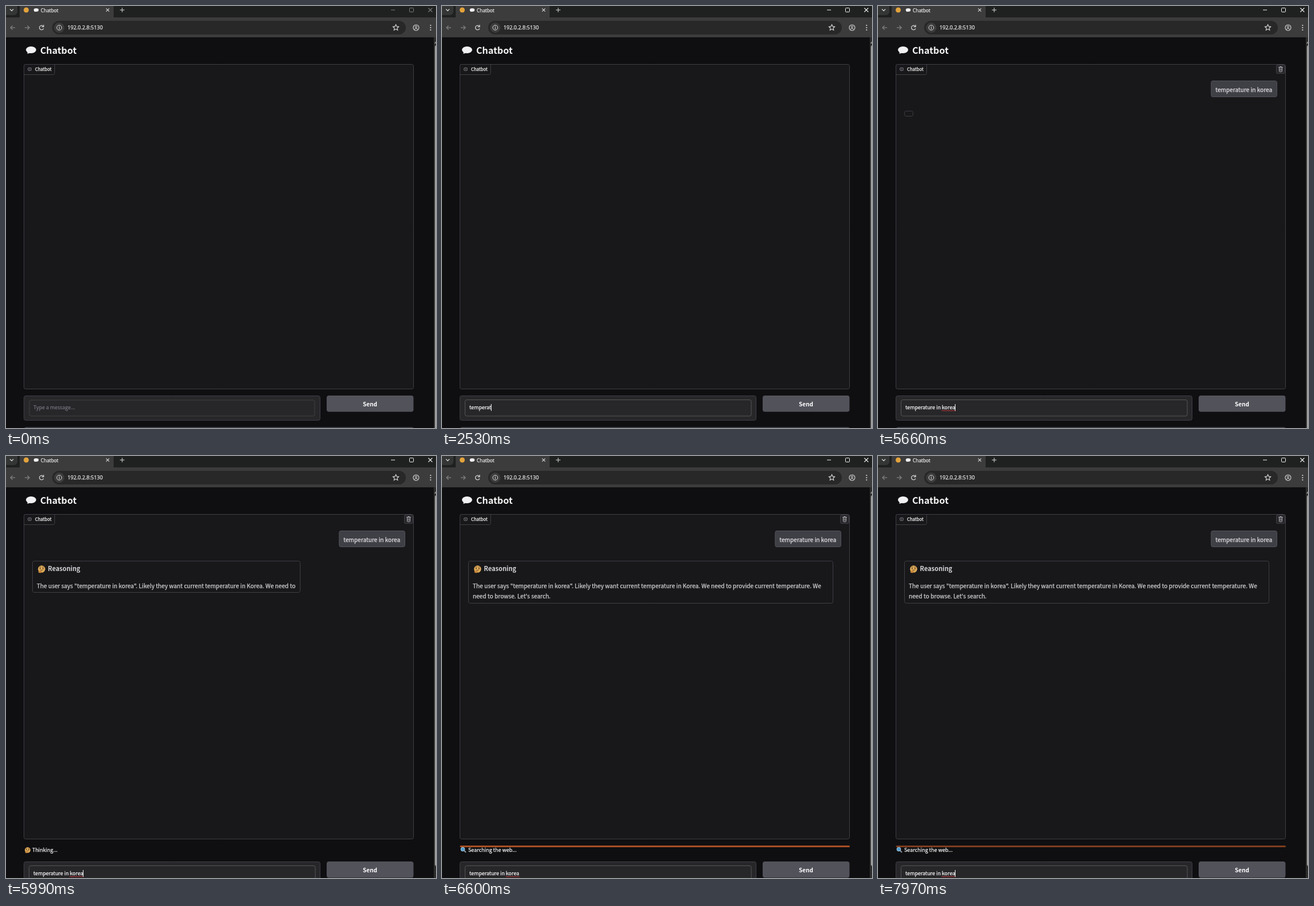
Write an HTML page with a canvas that moves like this. It is 755x741 px and loops after 8000 ms.

```html
<!DOCTYPE html>
<html lang="en">
<head>
<meta charset="utf-8">
<title>Chatbot</title>
<style>
html, body { margin: 0; width: 100%; height: 100%; overflow: hidden; background: #0f0f11; }
canvas { display: block; }
</style>
</head>
<body>
<canvas id="stage" width="755" height="741"></canvas>
<script>
const ctx = document.getElementById('stage').getContext('2d', { alpha: false });
const SANS = '"Noto Sans CJK KR", "Noto Sans CJK JP", "Noto Sans CJK SC", "Noto Sans CJK", sans-serif';
const UI = '"Open Sans", "Noto Sans", sans-serif';
const QUERY = 'temperature in korea';
const THOUGHT = `The user says "${QUERY}". Likely they want current temperature in Korea. We need to`;

const LOOP = 8000, BLINK = 530, KEY_GAP = 92;
const AWAKE = 130, FOCUS = 530, SENT = 4930, REPLY = 5050, SPELL = 5620, REASON = 5990, SEARCH = 6060;
// Keys come in bursts, evenly spaced within each
const BURSTS = { 1200: 'te', 1810: 'm', 2060: 'pe', 2330: 'rat', 3410: 'ure ', 3820: 'in ', 4220: 'korea' };

const PAGE = '#0f0f11', PANEL = '#18181a', BLOCK = '#27272a', EDGE = '#3f3f46';
const WHITE = '#f4f4f5', ICON = '#dedede', MUTED = '#868686';

const clamp = v => Math.max(0, Math.min(1, v));
const mix = (a, b, k) => Math.round(a + (b - a) * k);
const grey = v => `rgb(${v},${v},${v})`;

function rect(x, y, w, h, fill) {
  ctx.fillStyle = fill;
  ctx.fillRect(x, y, w, h);
}

function box(x, y, w, h, r, fill, edge) {
  ctx.beginPath();
  ctx.roundRect(x, y, w, h, r);
  if (fill) { ctx.fillStyle = fill; ctx.fill(); }
  if (edge) { ctx.strokeStyle = edge; ctx.lineWidth = 1; ctx.stroke(); }
}

function text(str, x, y, size, color, weight = 400, family = SANS) {
  ctx.font = `${weight} ${size}px ${family}`;
  ctx.fillStyle = ctx.strokeStyle = color;
  ctx.fillText(str, x, y);
  if (weight === 400) {
    ctx.lineWidth = .25;
    ctx.strokeText(str, x, y);
  }
}

function line(x1, y1, x2, y2, color, width = 1) {
  ctx.beginPath();
  ctx.moveTo(x1, y1);
  ctx.lineTo(x2, y2);
  ctx.strokeStyle = color;
  ctx.lineWidth = width;
  ctx.stroke();
}

function oval(x, y, rx, ry, fill) {
  ctx.beginPath();
  ctx.ellipse(x, y, rx, ry, 0, 0, 7);
  ctx.fillStyle = fill;
  ctx.fill();
}

function ring(x, y, r, color, width = 1, from = 0, to = 2 * Math.PI) {
  ctx.beginPath();
  ctx.arc(x, y, r, from, to);
  ctx.strokeStyle = color;
  ctx.lineWidth = width;
  ctx.stroke();
}

// An open angle with its tip at x, y
function chevron(x, y, size, turn, color) {
  ctx.save();
  ctx.translate(x, y);
  ctx.rotate(turn);
  line(-size, -size, .4, .4, color, 1.2);
  line(-size, size, .4, -.4, color, 1.2);
  ctx.restore();
}

function arrow(x, y, dir) {
  line(x - 4 * dir, y, x + 4 * dir, y, MUTED, 1.2);
  chevron(x + 4 * dir, y, 3.5, dir < 0 ? Math.PI : 0, MUTED);
}

function cross(x, y, r, color) {
  line(x - r, y - r, x + r, y + r, color, 1.1);
  line(x + r, y - r, x - r, y + r, color, 1.1);
}

function balloon(x, y, s) {
  oval(x, y, 9 * s, 6 * s, '#f0f0f2');
  ctx.beginPath();
  ctx.moveTo(x - 6 * s, y + 2 * s);
  ctx.lineTo(x - 6.5 * s, y + 7 * s);
  ctx.lineTo(x - s, y + 5 * s);
  ctx.fill();
}

function thinker(x, y, r) {
  oval(x, y, r, r, '#dfab58');
  for (const side of [-1, 1]) {
    const ex = x + side * r * .4;
    oval(ex, y - r * .15, r * .15, r * .18, '#3d2a1c');
    line(ex - r * .25, y - r * .55, ex + r * .25, y - r * .6, '#6b4828', r * .15);
  }
  line(x - r * .3, y + r * .35, x + r * .35, y + r * .25, '#6b4828', r * .15);
  oval(x - r * .4, y + r * .75, r * .5, r * .32, '#c4853c');
}

function lens(x, y) {
  line(x + 1.5, y + 1.5, x + 4.5, y + 4.5, '#8c959d', 2);
  oval(x - 1, y - 1, 3.6, 3.6, '#4f9dd0');
  ring(x - 1, y - 1, 3.4, '#a8c9dc');
}

function star(x, y, r) {
  ctx.beginPath();
  for (let i = 0; i < 10; i++) {
    const a = (i * .2 - .5) * Math.PI, d = i % 2 ? r * .48 : r;
    ctx.lineTo(x + d * Math.cos(a), y + d * Math.sin(a));
  }
  ctx.closePath();
  ctx.strokeStyle = ICON;
  ctx.lineWidth = 1.1;
  ctx.stroke();
}

function bin(x, y) {
  const color = '#b4b4ba';
  rect(x - 4, y - 4, 8, 1, color);
  rect(x - 1.5, y - 5, 3, 1, color);
  box(x - 2.5, y - 3.5, 5, 8, 1, null, color);
  for (const dx of [-.8, .8]) line(x + dx, y - 2, x + dx, y + 3, color, .7);
}

function squiggle(x1, x2, y) {
  ctx.beginPath();
  for (let x = x1; x <= x2; x += .5) ctx.lineTo(x, y + .8 * Math.sin(x * 2.1));
  ctx.strokeStyle = '#d93a3a';
  ctx.lineWidth = .9;
  ctx.stroke();
}

function tabs(t) {
  rect(0, 0, 755, 20, '#1f2020');
  box(-4, -6, 24, 22, 6, '#343535');
  chevron(10, 8.5, 3, Math.PI / 2, ICON);
  box(24, -8, 165, 34, 6, '#3c3c3c');
  oval(35.5, 7, 4.5, 4.5, '#e3a33c');
  balloon(53, 7, .48);
  text('Chatbot', 61, 11, 8.35, '#e6e6e6', 400, UI);
  cross(178.5, 7, 2.7, ICON);
  rect(200, 6.5, 8, 1, ICON);
  rect(203.5, 3, 1, 8, ICON);

  const c = grey(mix(125, 245, clamp((t - AWAKE) / 200)));
  rect(676, 6.5, 7, 1, c);
  box(708.5, 3.5, 7, 7, 1, null, c);
  cross(745, 7, 3.5, c);
}

function toolbar() {
  const y = 38;
  rect(0, 20, 755, 35, '#3c3c3c');
  arrow(12, y, -1);
  arrow(37, y, 1);
  ring(62.5, y, 3.8, ICON, 1.2, .4, 5.5);
  chevron(66, y - 1.5, 2.4, Math.PI / 4, ICON);

  box(81, 26, 621, 24, 12, '#282828');
  oval(93.5, y, 9, 9, '#3c3c3c');
  ring(93.5, y, 4.3, ICON);
  rect(93, y - 1, 1, 3.5, ICON);
  rect(93, y - 3, 1, 1, ICON);
  text('192.0.2.8:5130', 108, 41, 9.15, '#e8e8e8', 400, UI);
  star(684.5, y, 5.4);
  ring(720, y, 5, ICON, 1.1);
  ring(720, y - 1.4, 1.6, ICON);
  ring(720, y + 5, 3.6, ICON, 1, 3.75, 5.67);
  for (const dy of [-4, 0, 4]) oval(745.5, y + dy, 1.1, 1.1, ICON);
}

function scrollbar(end) {
  rect(751, 55, 4, 686, '#2c2c2c');
  line(753, 66, 755, 63, '#9f9f9f', 1.5);
  box(753, 69, 6, end - 69, 3, '#9f9f9f');
}

function panel() {
  balloon(44, 77, 1);
  text('Chatbot', 60, 84, 16.2, WHITE, 700);
  box(31.5, 102.5, 684, 570, 3, PANEL, EDGE);
  box(31.5, 102.5, 54, 18, [3, 0, 3, 0], PANEL, EDGE);
  box(38.5, 108.5, 6, 5, 2, null, '#85858c');
  rect(40, 110.5, 3, 1, '#85858c');
  text('Chatbot', 51, 114, 7.7, WHITE);
}

function chat(t) {
  if (t < SENT) return;
  box(699.5, 103.5, 15, 15, 2, BLOCK, EDGE);
  bin(707, 111);
  box(585, 131.5, 115.5, 28, 3, EDGE, '#52525b');
  text(QUERY, 592.5, 151, 10.2, '#e0e0e4');

  if (t < REPLY) return;
  const open = t >= REASON, full = t >= SEARCH;
  const w = full ? 640 : open ? 470 : 15;
  const h = full ? 74 : open ? 55 : 9;
  box(46.5, 184.5, w, h, 3, PANEL, EDGE);
  if (!open) return;
  thinker(62.5, 198.5, 6.3);
  text('Reasoning', 73.5, 202, 11.1, '#d4d4d8', 700);
  text(full ? THOUGHT + ' provide current temperature. We' : THOUGHT, 54, 232, 10.2, '#d0d0d4');
  if (full) text("need to browse. Let's search.", 54, 250, 10.2, '#d0d0d4');
}

function status(t) {
  if (t < REASON) return;
  const search = t >= SEARCH;
  if (search) {
    ctx.globalAlpha = .75 + .25 * Math.cos((t - SENT - 190) / 1000 * Math.PI);
    box(31.5, 684, 684.5, 3, 1.5, '#e2672a');
    ctx.globalAlpha = 1;
    lens(37.5, 691.5);
  } else {
    thinker(38, 692, 5);
  }
  text(search ? 'Searching the web...' : 'Thinking...', 46, 695, 9.03, WHITE);
}

function typing(t) {
  let typed = '', last = FOCUS;
  for (const [start, keys] of Object.entries(BURSTS)) {
    if (t < start) break;
    const n = Math.min(keys.length, 1 + Math.floor((t - start) / KEY_GAP));
    typed += keys.slice(0, n);
    last = +start + (n - 1) * KEY_GAP;
  }
  const caret = t >= FOCUS && Math.floor((t - last) / BLINK) % 2 === 0;
  return { typed, caret };
}

function composer(t) {
  const { typed, caret } = typing(t);
  const k = clamp((t - FOCUS) / 200);

  ctx.save();
  ctx.translate(0, t >= REASON ? 28 : 0);
  box(31.5, 684.5, 520, 43, 3, BLOCK, EDGE);
  box(41 - k * .5, 692 - k * .5, 501 + k * 1.5, 28 + k * .5, 3, BLOCK, grey(mix(64, 85, k)));
  text(typed || 'Type a message...', 48, 708, 8.95, typed ? WHITE : '#71717a');
  const end = Math.round(48 + (typed ? ctx.measureText(typed).width : 0));
  if (t >= SPELL) squiggle(112, 136, 710.5);
  if (caret) rect(end, 699, 1, 12, WHITE);

  box(563, 684, 152.5, 28.5, 4, '#52525b');
  text('Send', 626.5, 703, 10.1, '#ffffff', 700);
  box(32, 739.5, 684, 20, 3, '#45454d');
  ctx.restore();
}

function draw(t) {
  rect(0, 0, 755, 741, PAGE);
  tabs(t);
  toolbar();
  scrollbar(t >= REASON ? 720 : 745);
  panel();
  chat(t);
  status(t);
  composer(t);
}

const begin = performance.now();
function tick() {
  draw((performance.now() - begin) % LOOP);
  requestAnimationFrame(tick);
}
tick();
</script>
</body>
</html>
```
